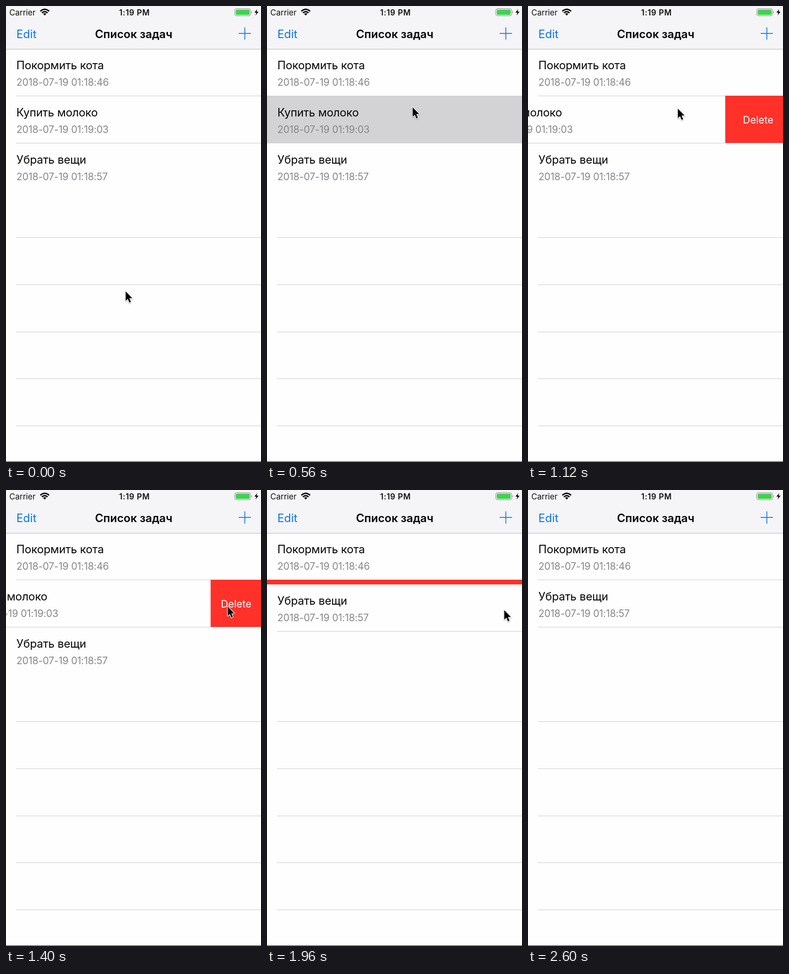
Animation of 540x966 px, one loop 2.96 s. Source, as an HTML page:

```html
<!DOCTYPE html>
<html lang="ru">
<head>
<meta charset="utf-8">
<title>Список задач</title>
<style>
  html, body { margin: 0; width: 100%; height: 100%; overflow: hidden; background: #fffeff; }
  svg { display: block; width: 540px; height: 966px; }
  text { font-family: Inter, "Open Sans", sans-serif; }
  .name { font-size: 23.75px; letter-spacing: -.008em; fill: #050505; }
  .date { font-size: 20.8px; letter-spacing: -.009em; fill: #87868a; }
  .line { fill: #c8c7cc; }
  .paper { fill: #fffeff; }
  .blue { fill: #0a74fa; }
  .edit { font-size: 23.9px; }
  .title { font-size: 23.9px; font-weight: 600; text-anchor: middle; }
  .status { font-size: 17px; fill: #111; }
  .clock { font-weight: 600; font-size: 16.8px; letter-spacing: .035em; text-anchor: middle; }
  .delete { font-size: 21.4px; fill: #fff; }
  #cursor { filter: drop-shadow(0 1.5px 1px rgba(0, 0, 0, .35)); }
</style>
</head>
<body>
<svg viewBox="0 0 540 966">
  <rect class="paper" width="540" height="966"/>
  <g id="lines"></g>

  <text class="name" x="22" y="134">Покормить кота</text>
  <text class="date" x="22" y="169">2018-07-19 01:18:46</text>

  <rect id="press" y="190" width="540" height="101" fill="#d3d2d5"/>
  <g id="cell">
    <text class="name" x="22" y="234">Купить молоко</text>
    <text class="date" x="22" y="269">2018-07-19 01:19:03</text>
  </g>
  <rect id="cellLine" class="line" y="290" width="540" height="1"/>
  <g id="action">
    <rect id="red" y="190" width="540" height="100" fill="#ff3129"/>
    <text class="delete" x="455" y="249">Delete</text>
  </g>

  <g id="last">
    <rect class="paper" y="291" width="540" height="99"/>
    <text class="name" x="22" y="334">Убрать вещи</text>
    <text class="date" x="22" y="369">2018-07-19 01:18:57</text>
    <rect id="lastLine" class="line" x="21" y="390" width="519" height="1"/>
  </g>

  <rect width="540" height="91" fill="#f5f4f7"/>
  <rect y="91" width="540" height="1" fill="#b4b3b6"/>
  <text class="status" x="7" y="19.5">Carrier</text>
  <g fill="none" stroke="#0a0a0a" stroke-width="2.9">
    <path d="M72.7 11.2Q82 2.8 91.3 11.2M76 14.7Q82 9.4 88 14.7"/>
    <path d="M78.6 16.6Q82 13.8 85.4 16.6L82 20.2Z" fill="#0a0a0a" stroke="none"/>
  </g>
  <text class="status clock" x="272" y="19.5">1:19 PM</text>
  <rect x="484.4" y="5.8" width="33.6" height="14.9" rx="3.5" fill="none" stroke="#858488"/>
  <rect x="486.5" y="7.7" width="29.5" height="11" rx="2" fill="#42d153"/>
  <path d="M519.5 10.7Q522 13.2 519.5 15.7Z" fill="#858488"/>
  <path d="M532 6.5L526 14H530L528.5 20L534.8 12H530.8Z" fill="#0a0a0a"/>
  <text class="edit blue" x="22" y="68">Edit</text>
  <text class="title" x="270.5" y="68">Список задач</text>
  <path d="M492.7 58.2H518.7M505.7 45.2V71.2" stroke="#0a74fa" stroke-width="1.7"/>

  <rect y="965" width="540" height="1" fill="#111"/>
  <path id="cursor" d="M.4 .4V20.6L5 16.4L8.3 24.2L11.5 22.8L8.2 15.1H14.4Z"
        stroke="#fff" stroke-width="2.6" stroke-linejoin="round" paint-order="stroke"/>
</svg>
<script>
const LOOP = 2960, STEP = 40;
const PRESS = 520, PAN = 600, RELEASE = 840, REMOVE = 1760, SETTLED = 2120;
const ROW = 99.84, LIST_TOP = 90.5;
const ui = {};
document.querySelectorAll('[id]').forEach(el => ui[el.id] = el);

// separators under the first row and the empty rows
for (const n of [1, 4, 5, 6, 7, 8])
  ui.lines.innerHTML +=
    `<rect class="line" x="21" y="${Math.round(LIST_TOP + n * ROW)}" width="519" height="1"/>`;

// time, x, y of the pointer tip
const path = [
  [0, 253, 604], [140, 310, 430], [280, 390, 218], [440, 390, 218],
  [560, 308, 214], [680, 166, 211], [760, 104, 210], [840, 92, 211],
  [1000, 210, 213], [1120, 317, 217], [1320, 440, 240], [1560, 502, 254],
  [2120, 502, 254], [2360, 480, 110], [2600, 462, -40]
];

const slope = (i, k) => (path[i + 1][k] - path[i][k]) / (path[i + 1][0] - path[i][0]);

// flat at stops and turns, averaged elsewhere
function tangent(i, k) {
  if (i === 0 || i === path.length - 1) return 0;
  const a = slope(i - 1, k), b = slope(i, k);
  return a * b <= 0 ? 0 : 2 * a * b / (a + b);
}

function pointer(t, k) {
  const end = path.length - 1;
  if (t >= path[end][0]) return path[end][k];
  const i = path.findIndex(p => p[0] > t) - 1;
  const span = path[i + 1][0] - path[i][0], u = (t - path[i][0]) / span, v = 1 - u;
  return path[i][k] * (1 + 2 * u) * v * v + path[i + 1][k] * u * u * (3 - 2 * u)
    + span * u * v * (tangent(i, k) * v - tangent(i + 1, k) * u);
}

// remaining share of a critically damped spring
const spring = (ms, rate) => (1 + rate * ms / 1000) * Math.exp(-rate * ms / 1000);

function swipe(t) {
  if (t < PAN) return 0;
  if (t < RELEASE) return 348 - pointer(t, 1);
  return 106 + 150 * spring(t - RELEASE, 13.5);
}

const show = (el, on) => el.style.display = on ? '' : 'none';
const move = (el, x, y) => el.setAttribute('transform', `translate(${x.toFixed(2)} ${y.toFixed(2)})`);

function draw(t) {
  const removed = t >= REMOVE, after = Math.max(0, t - REMOVE);
  const off = swipe(t);
  const grow = 1 - (1 - Math.min(1, after / 180)) ** 2;
  const lift = t > SETTLED ? 100 : 100 * (1 - spring(after, 19.8));

  show(ui.press, t >= PRESS && t < PAN);
  show(ui.cell, !removed);
  move(ui.cell, -off, 0);
  show(ui.cellLine, t < PRESS || t >= PAN);
  ui.cellLine.setAttribute('x', removed ? 21 : Math.max(0, 21 - off));

  show(ui.action, off > 0 && t <= SETTLED);
  ui.red.setAttribute('x', ((540 - off) * (1 - grow)).toFixed(2));

  move(ui.last, 0, -Math.round(lift));
  show(ui.lastLine, t > REMOVE);
  move(ui.cursor, pointer(t, 1), pointer(t, 2));
}

const start = performance.now();
function tick(now) {
  const t = Math.max(0, now - start) % LOOP;
  draw(Math.floor(t / STEP) * STEP);
  requestAnimationFrame(tick);
}
draw(0);
requestAnimationFrame(tick);
</script>
</body>
</html>
```
